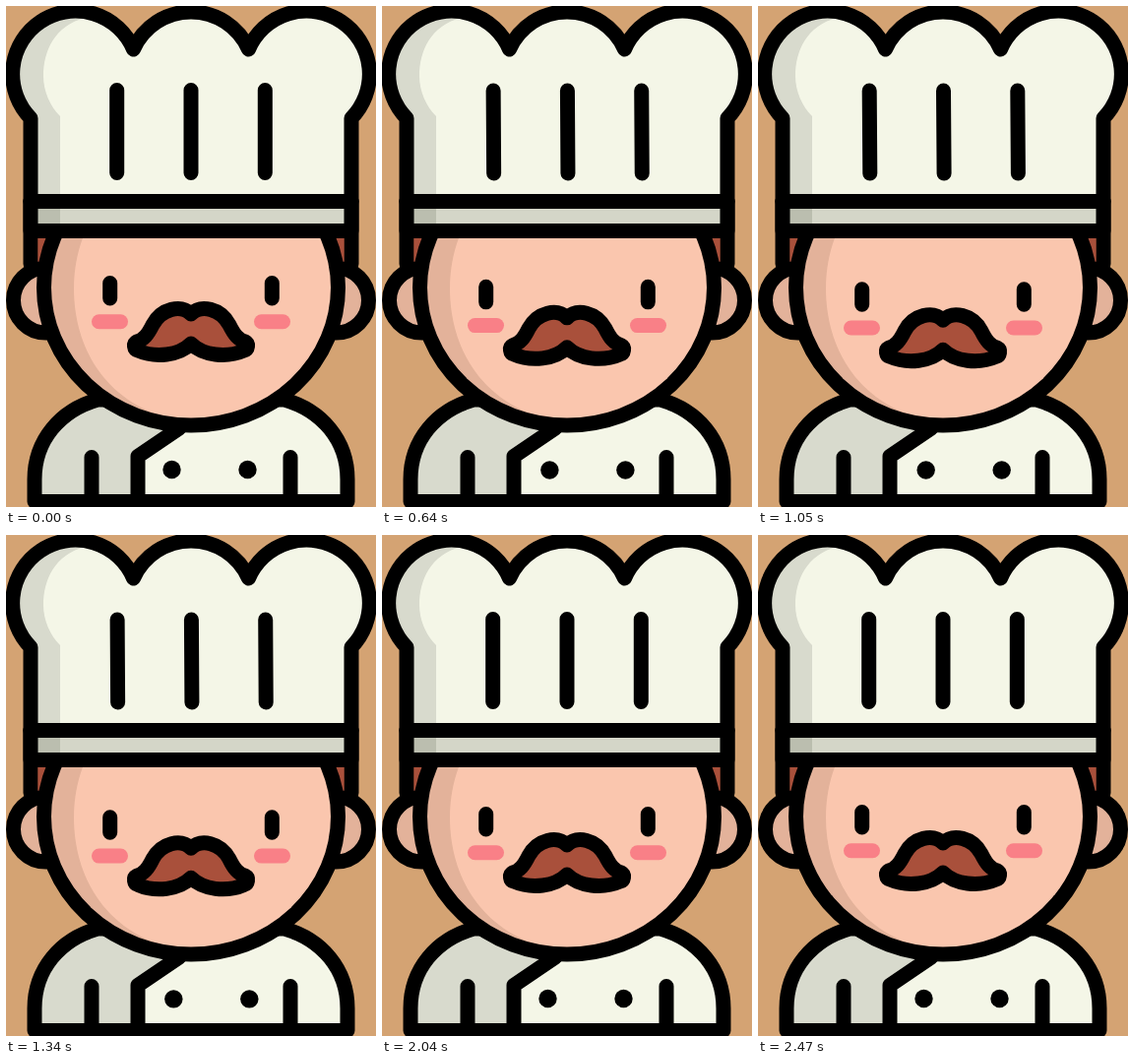
An HTML page that plays this animation: 376x509 px, repeating every 2.5 s.

```html
<!DOCTYPE html>
<html lang="en">
<head>
<meta charset="utf-8">
<title>Chef</title>
<style>
  html, body { margin: 0; width: 100%; height: 100%; overflow: hidden; background: #d4a373; }
  svg { display: block; width: 100vw; height: 100vh; }
  .line { fill: none; stroke: #000; stroke-width: 15; stroke-linecap: round; stroke-linejoin: round; }
  .light { fill: #f4f6e7; }
  .shade { fill: #d8dacd; }
  .skin { fill: #fac6ae; }
  .skin-shade { fill: #e3b29a; }
  .hair { fill: #a9503b; }
  .cheek { fill: #f98087; }
</style>
</head>
<body>
<svg viewBox="0 0 376 509">
  <defs>
    <path id="body" d="M29 503.5V481C29 441 55 411 93 400H283C321 411 347 441 347 481V503.5Z"/>
    <path id="hat" d="M25 198.5V114A64 64 0 1 1 129.5 44A64 64 0 0 1 246.5 44A64 64 0 1 1 351 114V198.5Z"/>
    <clipPath id="hatClip"><use href="#hat"/></clipPath>
    <clipPath id="faceClip"><ellipse cx="188" cy="286" rx="149.5" ry="140"/></clipPath>
  </defs>

  <g id="torso">
    <use href="#body" class="light"/>
    <path class="shade" d="M29 503.5V481C29 441 55 411 93 400H190L169 434L134 457.5V503.5Z"/>
    <use href="#body" class="line"/>
    <path class="line" d="M176 429L134 457.5V503M87 458.5V503M289 458.5V503"/>
    <g id="buttons"><circle cx="168.5" cy="471" r="9.2"/><circle cx="245.5" cy="471" r="9.2"/></g>
  </g>

  <g id="head">
    <path class="hair" d="M25 228H351V290H25Z"/>
    <g class="line">
      <path d="M25 198V262M351 198V262"/>
      <circle class="skin-shade" cx="40.5" cy="299" r="33" style="fill:#e3b29a"/>
      <circle class="skin-shade" cx="335.5" cy="299" r="33" style="fill:#e3b29a"/>
    </g>
    <path class="hair" d="M32.5 236H60V257Q42 256 32.5 260ZM343.5 236H316V257Q334 256 343.5 260Z"/>
    <ellipse class="skin" cx="188" cy="286" rx="149.5" ry="140"/>
    <path class="skin-shade" clip-path="url(#faceClip)" d="M78 236C57 290 68 390 163 418V440H20V236Z"/>
    <ellipse class="line" cx="188" cy="286" rx="149.5" ry="140"/>
  </g>

  <g id="face">
    <rect class="cheek" x="87" y="313.3" width="37" height="15" rx="7.5"/>
    <rect class="cheek" x="252" y="313.3" width="37" height="15" rx="7.5"/>
    <path class="line" d="M105.7 281.5V297M270.3 281.5V297"/>
    <path class="line" style="fill:#a9503b" d="M188 313C178 303 158 307 149 324C144 334 140 339 133 341C129 343 130 349 134 350C152 358 176 355 188 343C200 355 224 358 242 350C246 349 247 343 243 341C236 339 232 334 227 324C218 307 198 303 188 313Z"/>
  </g>

  <path class="light" d="M25 100H351V228.5H25Z"/>
  <use href="#hat" class="light"/>
  <path class="shade" clip-path="url(#hatClip)" d="M80 12C50 20 38 45 38 71C38 87 45 102 55 112V198H0V0H80Z"/>
  <path class="shade" style="fill:#d4d6c8" d="M25 198.5H351V228.5H25Z"/>
  <path fill="#bbbeaf" d="M25 198.5H55V228.5H25Z"/>
  <use href="#hat" class="line"/>
  <path class="line" d="M25 198.5V228.5H351V198.5"/>
  <path id="pleats" class="line"/>
</svg>
<script>
  const LOOP = 2500, PEAK = 1090, END = 2470;
  const byId = id => document.getElementById(id);
  const face = byId('face'), buttons = byId('buttons'), pleats = byId('pleats');

  function draw(now) {
    const t = now % LOOP;
    const drop = 6.5 * Math.max(0, Math.min(t / PEAK, (END - t) / (END - PEAK)));
    const sway = Math.max(0, Math.sin(Math.PI * t / 1950));

    face.setAttribute('transform', `translate(0 ${drop})`);
    buttons.setAttribute('transform', `translate(${2.2 * sway} ${0.5 * sway})`);
    pleats.setAttribute('d', [112.7, 188, 263.3].map(x =>
      `M${x + 0.5 * sway} ${85.5 + 0.6 * sway}L${x + 1.1 * sway} ${169.5 + 0.6 * sway}`).join(''));
    requestAnimationFrame(draw);
  }
  requestAnimationFrame(draw);
</script>
</body>
</html>
```
